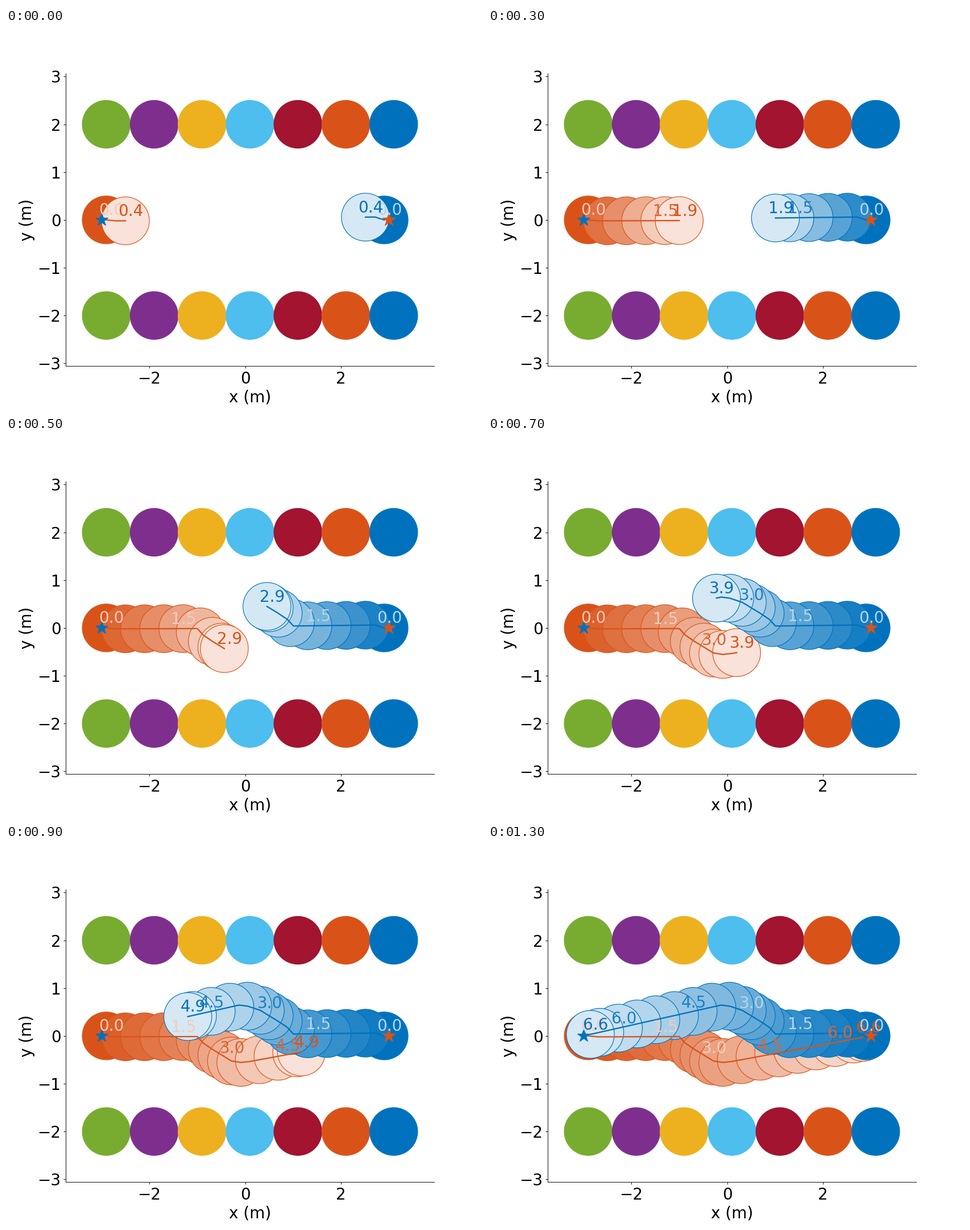
Animation, 837 px wide and 669 px high, one loop 2300 ms. Source, as a matplotlib script:

```python
import numpy as np
import matplotlib.pyplot as plt
from matplotlib.animation import FuncAnimation
from matplotlib.colors import to_rgb
from matplotlib.patches import Circle

W, H, DPI = 837, 669, 83.7
RADIUS = 0.5
T_FIRST, T_STEP, T_END = 0.4, 0.5, 6.6
FADE = 1.2  # keeps the newest disc slightly tinted

ORANGE, BLUE = "#d95319", "#0072bd"
ROW = ["#77ac30", "#7e2f8e", "#edb120", "#4dbeee", "#a2142f", ORANGE, BLUE]

# Turning points x + yj of the two agents, reached at the shared times
KEY_T = [0, 0.2, 1.9, 2.1, 2.4, 3.2, 3.6, 3.8, T_END]
ORANGE_PATH = [-2.9, -2.7 - 0.02j, -1 - 0.014j, -0.875 - 0.15j, -0.685 - 0.28j,
               -0.285 - 0.525j, -0.09 - 0.555j, 0.1 - 0.535j, 2.836 - 0.03j]
BLUE_PATH = [2.9, 2.71 + 0.06j, 1.008 + 0.04j, 0.878 + 0.18j, 0.688 + 0.307j,
             0.315 + 0.535j, 0.053 + 0.622j, -0.125 + 0.645j, -2.855 + 0.032j]
AGENTS = [(ORANGE, ORANGE_PATH, 3), (BLUE, BLUE_PATH, -3)]

plt.rcParams.update({"font.family": "DejaVu Sans", "font.size": 24})
# The small excess guards against rounding down to one pixel less
fig, ax = plt.subplots(figsize=((W + 0.01) / DPI, (H + 0.01) / DPI), dpi=DPI)
half_x = 3.85
half_y = half_x * (0.77 * 8) / (0.775 * 10)
ax.set(xlim=(0.1 - half_x, 0.1 + half_x), ylim=(-half_y, half_y),
       xticks=(-2, 0, 2), yticks=range(-3, 4), xlabel="x (m)", ylabel="y (m)")
ax.spines[["top", "right"]].set_visible(False)


def tint(color, alpha):
    return tuple(1 - alpha * (1 - c) for c in to_rgb(color))


def position(path, t):
    p = np.interp(t, KEY_T, path)
    return p.real, p.imag


def disc(center, fill, edge):
    return ax.add_patch(Circle(center, RADIUS, fc=fill, ec=edge))


def label(path, t, color):
    x, y = position(path, t)
    return ax.text(x - 0.15, y + 0.1, f"{t:.1f}", color=color)


def draw_agent(color, path, goal_x, now):
    span = FADE * now
    steps = np.arange(round(now * 10) + 1) / 10
    parts = ax.plot(*position(path, steps), color=color, lw=2)
    parts += ax.plot(goal_x, 0, color=color, marker="*", ms=20)
    for t in [*np.arange(0, now - 0.01, 0.4), now]:
        parts.append(disc(position(path, t), tint(color, 1 - t / span), color))
    for t in np.arange(0, now - 0.01, 1.5):
        parts.append(label(path, t, tint(color, 0.3 if t / span < 0.5 else 0.9)))
    parts.append(label(path, now, color))
    return parts


for y in (2, -2):
    for k, color in enumerate(ROW):
        disc((k - 2.9, y), color, color)

moving = []


def update(i):
    while moving:
        moving.pop().remove()
    now = min(T_FIRST + T_STEP * i, T_END)
    for agent in AGENTS:
        moving.extend(draw_agent(*agent, now))
    return moving


anim = FuncAnimation(fig, update, frames=23, init_func=lambda: update(0),
                     interval=100, repeat=True, repeat_delay=0, blit=False)
plt.show()
```
